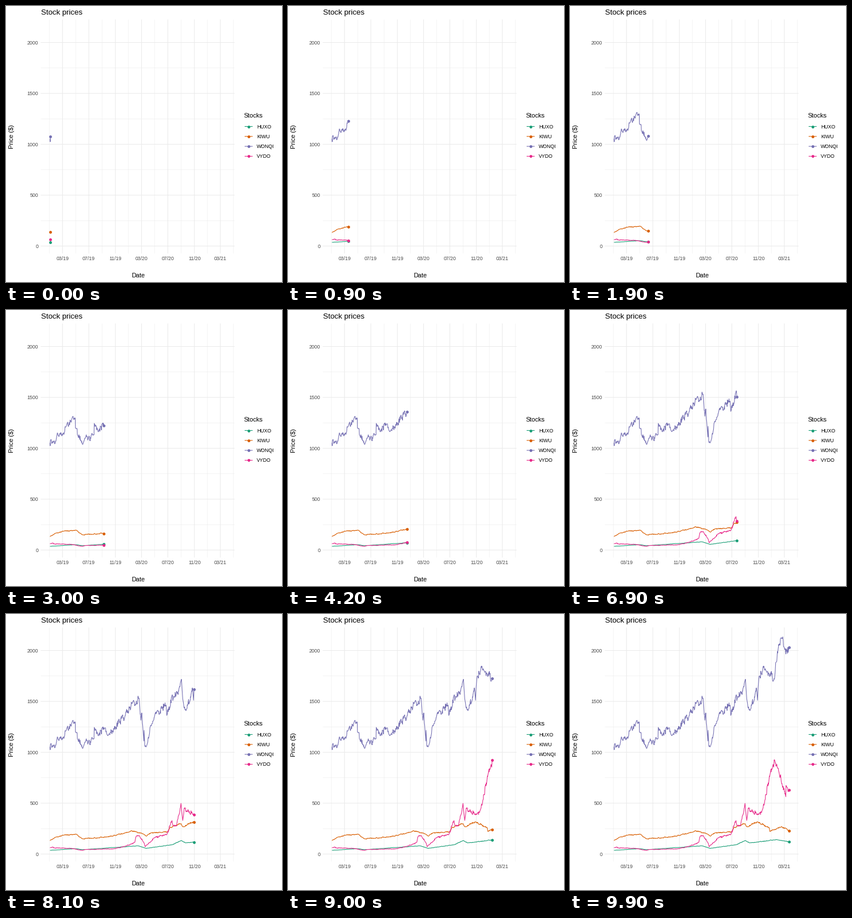
A matplotlib script that plays this animation: 480x480 px, repeating every 10000 ms.

```python
import numpy as np
import matplotlib.pyplot as plt
from matplotlib.animation import FuncAnimation

SIZE, DPI = 480, 72
FRAMES, INTERVAL = 100, 100
LAST_DAY = 812
START = np.datetime64("2019-01-02")
HOLIDAYS = ["2020-01-01", "2020-12-25"]
LEFT, RIGHT, TOP, BOTTOM = 61, 397, 24, 430


def px(day):
    return 76.5 + 0.3754 * day


def py(price):
    return 417.5 - 0.177 * price


def day_of(date):
    return (np.datetime64(date) - START).astype(int)


calendar = np.arange(LAST_DAY + 1)
days = calendar[np.is_busday(START + calendar, holidays=HOLIDAYS)]
rng = np.random.default_rng(7)

plt.rcParams["font.family"] = "Liberation Sans"
fig = plt.figure(figsize=(SIZE / DPI, SIZE / DPI), dpi=DPI, facecolor="white")
ax = fig.add_axes([0, 0, 1, 1])
ax.set(xlim=(0, SIZE), ylim=(SIZE, 0))
ax.axis("off")


def label(x, y, text, size, color="black", **kw):
    ax.text(x, y, text, fontsize=size, color=color, **kw)


def rule(xs, ys, major):
    ax.plot(xs, ys, color="#EBEBEB", lw=1.07 if major else 0.53,
            snap=False, zorder=1)


def curve(xs, ys, color):
    return ax.plot(xs, ys, color=color, lw=1.07, snap=False, zorder=2,
                   solid_capstyle="butt", solid_joinstyle="round")[0]


def dot(x, y, color):
    return ax.plot([x], [y], "o", color=color, ms=4.9, mew=0, snap=False,
                   zorder=3)[0]


def daily_prices(points, rough):
    """Join the turning points, with jitter that vanishes on each of them."""
    at, price = np.array(points, float).reshape(-1, 2).T
    base = np.interp(days, at, price)
    gap = np.abs(days[:, None] - at).min(axis=1)
    steps = rng.normal(0, rough, len(days))
    drift = 0
    jitter = np.empty(len(days))
    for i, step in enumerate(steps):
        drift = 0.6 * drift + step
        jitter[i] = drift
    jitter = jitter.clip(-2 * rough, 2 * rough)
    return base * (1 + jitter * np.minimum(1, gap / 5))


series = []


def add_stock(name, color, rough, points):
    """Legend row plus curve; points run day, price, day, price ..."""
    y = 209.5 + 17.28 * len(series)
    curve([415, 428.9], [y, y], color)
    dot(422, y, color)
    label(436, y + 3.1, name, 8.8)
    ys = py(daily_prices(points, rough))
    series.append((ys, curve([], [], color), dot(0, 0, color)))


# Grid and tick labels
for value in range(0, 2001, 250):
    major = value % 500 == 0
    rule([LEFT, RIGHT], [py(value)] * 2, major)
    if major:
        label(56, py(value) + 3.2, str(value), 8.8, "#4D4D4D", ha="right")

months = np.datetime64("2019-03") + np.arange(0, 25, 4)
ticks = np.array([px(day_of(f"{m}-01")) for m in months])
for x, month in zip(ticks, months.astype(str)):
    rule([x, x], [TOP, BOTTOM], True)
    label(x, 442.2, f"{month[5:]}/{month[2:4]}", 8.8, "#4D4D4D", ha="center")
half = (ticks[1] - ticks[0]) / 2
for x in [ticks[0] - half, *(ticks[:-1] + ticks[1:]) / 2, ticks[-1] + half]:
    rule([x, x], [TOP, BOTTOM], False)

# Titles
label(61, 15, "Stock prices", 13.2)
label(229.5, 472, "Date", 11, ha="center")
label(10.3, 227.5, "Price ($)", 11, rotation=90, ha="center", va="center")
label(413, 194, "Stocks", 11)

add_stock("HUXO", "#1B9E77", 0.012, [
    0, 37, 120, 53, 151, 43, 407, 81, 446, 56, 569, 93, 608, 134,
    628, 110, 754, 143, 812, 120])
add_stock("KIWU", "#D95F02", 0.013, [
    0, 132, 29, 168, 61, 184, 121, 195, 151, 149, 265, 168, 348, 208,
    376, 230, 436, 194, 446, 176, 470, 209, 546, 216, 555, 261, 608, 298,
    615, 268, 664, 317, 719, 260, 722, 222, 777, 270, 812, 229])
add_stock("WONQI", "#7570B3", 0.013, [
    0, 1054, 1, 1025, 2, 1078, 27, 1070, 34, 1151, 55, 1122, 78, 1236,
    117, 1296, 118, 1199, 152, 1038, 159, 1082, 173, 1116, 175, 1080,
    204, 1135, 205, 1245, 224, 1164, 254, 1240, 273, 1177, 348, 1361,
    380, 1480, 413, 1525, 421, 1315, 425, 1386, 435, 1111, 436, 1215,
    439, 1073, 446, 1054, 471, 1280, 483, 1342, 538, 1464, 541, 1362,
    567, 1564, 569, 1508, 602, 1644, 609, 1717, 615, 1524, 630, 1409,
    660, 1632, 665, 1511, 667, 1616, 672, 1745, 701, 1821, 744, 1727,
    749, 1880, 763, 2058, 777, 2118, 791, 2011, 812, 2033])
add_stock("VYDO", "#E7298A", 0.025, [
    0, 62, 15, 69, 16, 60, 90, 58, 152, 36, 159, 43, 294, 51, 348, 76,
    393, 116, 398, 170, 413, 183, 436, 109, 441, 72, 483, 160, 541, 192,
    565, 329, 569, 283, 586, 275, 607, 498, 615, 330, 622, 450, 667, 388,
    684, 408, 737, 880, 754, 883, 796, 563, 797, 674, 812, 630])
xs = px(days)


def draw(frame):
    # Each step reveals whole trading days only
    reach = (frame + 0.5) * LAST_DAY / (FRAMES - 1)
    n = np.searchsorted(days, reach, side="right")
    artists = []
    for ys, line, head in series:
        line.set_data(xs[:n], ys[:n])
        head.set_data([xs[n - 1]], [ys[n - 1]])
        artists += [line, head]
    return artists


anim = FuncAnimation(fig, draw, frames=FRAMES, interval=INTERVAL,
                     repeat=True, repeat_delay=0)
plt.show()
```
